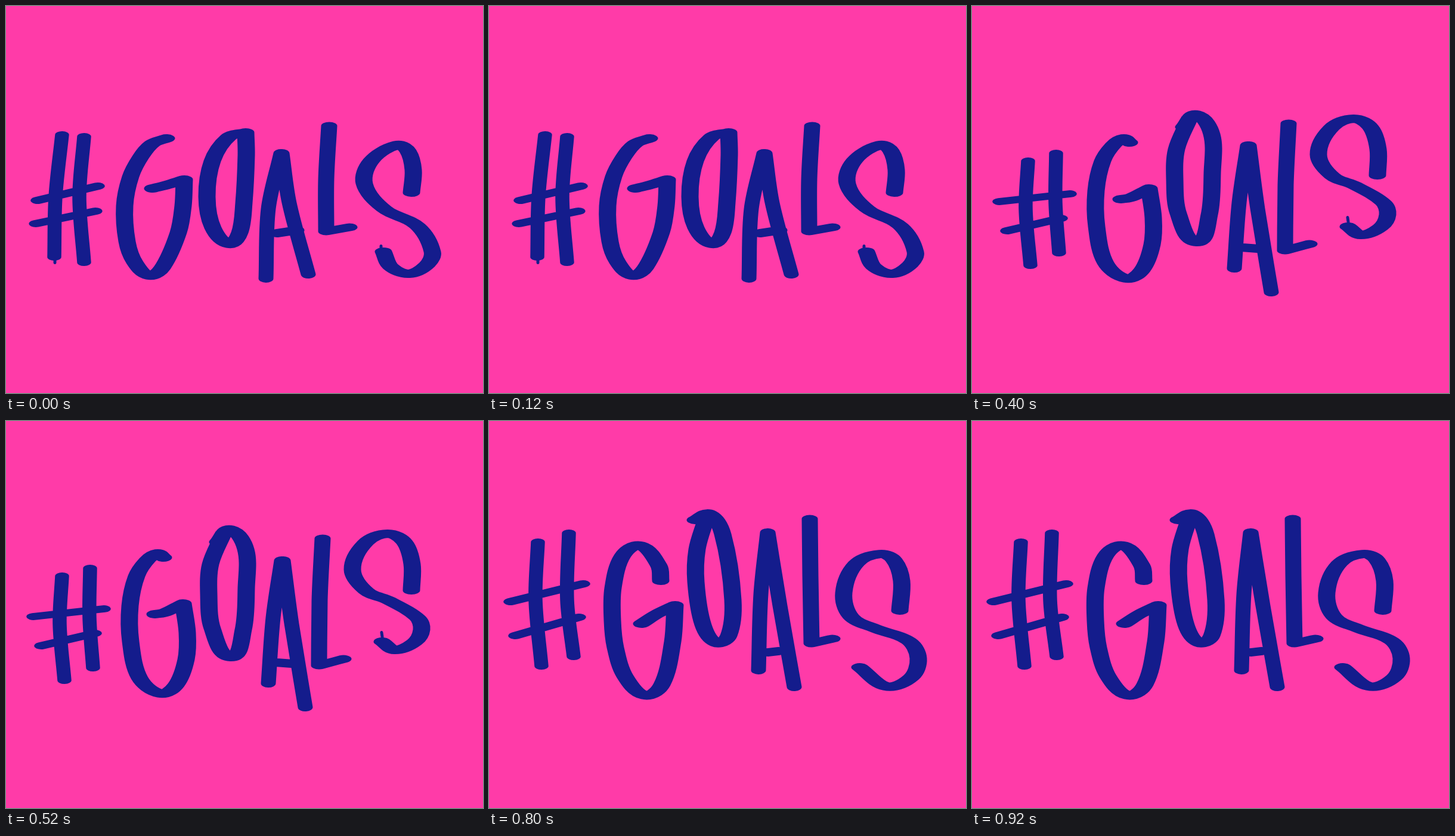
An HTML page with a canvas for the animation above (1 s loop, 800 px wide and 649 px high).

```html
<!DOCTYPE html>
<html lang="en">
<head>
<meta charset="utf-8">
<title>#GOALS</title>
<style>
html, body { margin: 0; height: 100%; overflow: hidden; background: #ff3ba8; }
canvas { display: block; }
</style>
</head>
<body>
<canvas id="stage" width="800" height="649" role="img" aria-label="#GOALS"></canvas>
<script>
const ctx = document.getElementById('stage').getContext('2d');

// Smooth line through "x y" points; "!" marks a corner.
function addLine(path, text) {
  const pts = text.split(',').map(p => {
    const [x, y] = p.split(' ').map(parseFloat);
    return { x, y, corner: p.endsWith('!') };
  });
  const handle = (i, dir) => {
    const p = pts[i], to = pts[i + dir];
    const from = p.corner ? p : pts[i - dir] || p;
    const dx = to.x - from.x, dy = to.y - from.y;
    const k = Math.hypot(to.x - p.x, to.y - p.y) / Math.hypot(dx, dy) / 3;
    return [p.x + dx * k, p.y + dy * k];
  };
  path.moveTo(pts[0].x, pts[0].y);
  for (let i = 1; i < pts.length; i++) {
    path.bezierCurveTo(...handle(i - 1, 1), ...handle(i, -1), pts[i].x, pts[i].y);
  }
}

// A letter is written with a flat oval nib, wide and low; "/" lifts the pen.
function letter(wide, high, poses) {
  const paths = poses.map(pose => {
    const line = new Path2D(), stretched = new Path2D();
    if (pose) pose.split('/').forEach(text => addLine(line, text));
    stretched.addPath(line, { d: wide / high });
    return stretched;
  });
  return step => {
    ctx.setTransform({ d: high / wide });
    ctx.lineWidth = wide;
    ctx.stroke(paths[step]);
  };
}

const hash = letter(23.5, 12, [
  '94 216,83 320,81 421/131 219,123 320,131 430/53 326,154 302/50 365,150 344',
  '108 207,101 320,105 447/141 201,138 310,154 422/53 303,169 273/63 342,178 310',
  '94 260,90 340,98 435/141 247,140 330,146 414/46 328,164 315/59 377,149 356',
  '96 199,92 300,102 421/144 186,142 290,154 399/48 313,165 286/60 356,184 324',
  '82 203,78 300,88 411/134 188,131 300,142 395/36 303,158 273/44 360,151 329'
]);

const g = letter(29, 14, [
  '269 222,245 231,226 253,209 286,199 335,203 395,216 430,240 452,262 439,289 380,297 335,299 291!,270 300,246 306',
  '321 163,294 153,268 165,246 192,226 238,218 300,223 350,236 389,273 413,298 397,310 345,313 262!,285 277,263 282',
  '264 229,254 222,237 233,219 260,208 310,209 370,224 431,259 457,285 443,302 400,304 355,297 306!,267 321,250 324',
  '306 191,289 176,258 191,232 227,213 290,213 355,228 412,263 444,287 430,303 388,309 335,306 283!,275 295,252 298',
  '288 268,285 243,254 209,224 226,208 280,207 335,212 380,228 428,261 460,290 442,308 370,312 309!,281 324,256 340'
]);

const o = letter(29, 14, [
  '402 212,373 220,346 260,337 320,347 372,374 399,392 380,399 330,403 250,402 212',
  '357 233,382 225,396 262,405 340,398 410,382 432,359 398,352 345,357 285,371 232',
  '355 203,376 182,402 215,403 280,398 350,377 396,346 348,340 290,343 240,365 188',
  '347 236,378 217,394 255,403 350,398 400,382 423,355 388,344 320,349 260,368 222',
  '346 166,370 156,392 190,409 300,402 360,381 372,359 342,347 270,349 215,364 164'
]);

const a = letter(25, 14, [
  '461 247,440 340,436 457/463 247,475 330,507 450/455 381,488 376',
  '473 171,448 270,445 369/472 170,479 275,498 403/462 338,482 339',
  '462 234,448 330,440 440/465 234,479 340,502 480/453 405,480 407',
  '451 218,444 310,443 448/452 218,472 325,511 459/434 381,489 374',
  '467 187,456 290,452 418/468 187,488 310,512 446/468 388,485 386'
]);

const l = letter(27, 13, [
  '542 201,537 290,537 378!,576 371',
  '546 203,539 310,545 455!,590 434',
  '531 197,526 300,525 410!,566 399',
  '547 189,537 290,536 400!,576 385',
  '538 164,539 260,541 373!,576 365'
]);

const s = letter(29, 14, [
  '680 313,683 275,674 243,656 233,613 259,601 298,634 340,690 369,715 412,706 434,676 449,645 437,633 412',
  '668 313,672 265,661 224,640 215,609 233,592 283,602 325,642 347,682 362,701 390,694 405,668 414,640 392',
  '680 284,681 240,668 203,640 189,603 204,581 249,604 285,642 301,690 330,697 350,685 371,652 384,631 370',
  '678 304,684 257,674 212,652 198,613 217,590 275,602 314,645 333,690 353,704 378,694 398,660 408,618 371',
  '689 318,692 268,679 233,656 223,616 239,595 288,607 328,648 348,704 369,720 398,708 430,666 445,622 413'
]);

// Small ink drips at stroke ends.
const drips = letter(5, 6, [
  '82 424,82 430/629 403,629 408', '', '630 355,631 362', '156 400,157 408', ''
]);

const word = [hash, g, o, a, l, s, drips];
const hold = 200, steps = 5;
const start = performance.now();

function draw() {
  const step = Math.floor((performance.now() - start) / hold) % steps;
  ctx.resetTransform();
  ctx.clearRect(0, 0, 800, 649);
  ctx.strokeStyle = '#141c8c';
  ctx.lineCap = ctx.lineJoin = 'round';
  word.forEach(write => write(step));
  requestAnimationFrame(draw);
}
draw();
</script>
</body>
</html>
```
